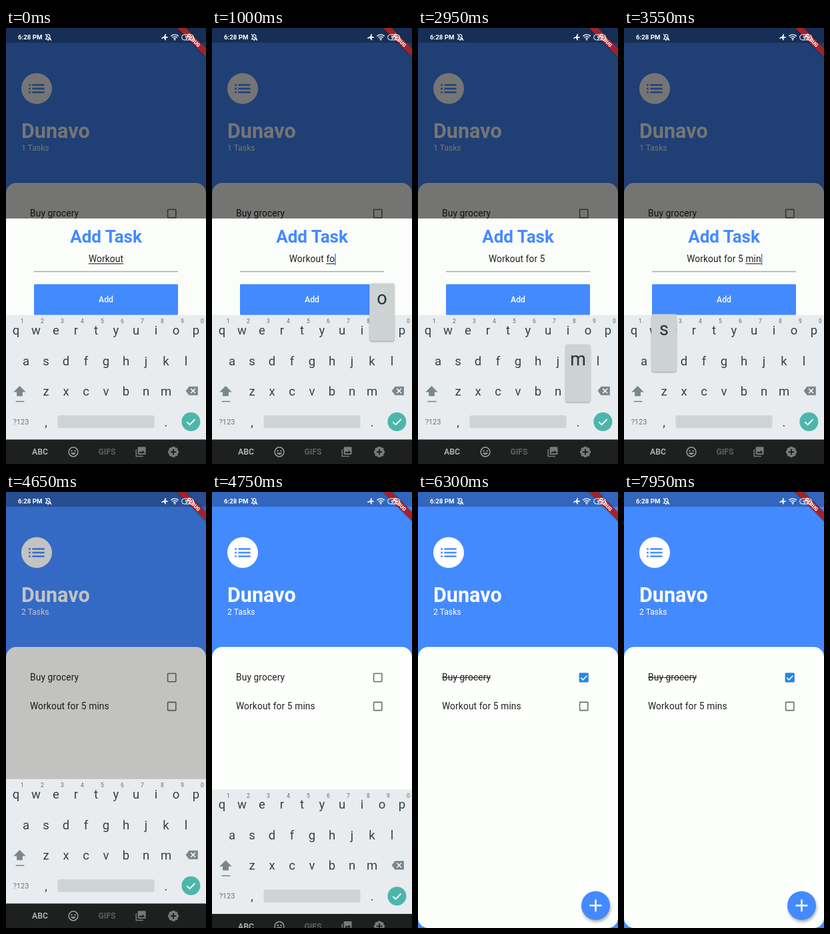
Recreate the animation shown at these times as an HTML page. Size 300x650 px, loop 8000 ms.

```html
<!DOCTYPE html>
<html lang="en">
<head>
<meta charset="utf-8">
<title>To-do list</title>
<style>
  html, body { margin: 0; width: 100%; height: 100%; overflow: hidden; background: #448aff; }
  svg { display: block; width: 100%; height: 100%; }
  text { font-family: Roboto, "Open Sans", sans-serif; white-space: pre; }
  .mid { text-anchor: middle; }
  .task { font-size: 13.75px; letter-spacing: .115px; fill: #212121; }
  .key { font-size: 18.5px; fill: #364147; text-anchor: middle; }
  .hint { font-size: 8.5px; fill: #5f6b70; text-anchor: middle; }
  .mode { font-size: 11px; fill: #68747a; text-anchor: middle; }
  .tab { font-size: 12.2px; font-weight: 700; text-anchor: middle; }
</style>
</head>
<body>
<svg id="stage" viewBox="0 0 300 650" preserveAspectRatio="none"></svg>
<script>
const LOOP = 8000;
const SHEET_OUT = 4550, BOARD_OUT = 4700, TICK = 5700;
const SPACE = '#ced3d5', SPACE_DOWN = '#b3babd';

// What the field holds from each time on
const edits = [
  [-700, 'Workout'], [700, 'Workout '], [850, 'Workout f'], [1000, 'Workout fo'],
  [1150, 'Workout for'], [1400, 'Workout for '], [1950, 'Workout for 5'],
  [2000, 'Workout for 5 '], [3000, 'Workout for 5 m'], [3150, 'Workout for 5 mi'],
  [3350, 'Workout for 5 min'], [3600, 'Workout for 5 mins']
];

// Key, centre x, row centre y, down, up
const presses = [
  ['f', 120, 496, 800, 900], ['o', 255, 450, 950, 1050], ['r', 105, 450, 1100, 1150],
  ['5', 135, 450, 1900, 1980], ['m', 240, 541, 2950, 3050], ['i', 225, 450, 3100, 3200],
  ['n', 210, 541, 3300, 3400], ['s', 60, 496, 3500, 3650]
];
const spaceDowns = [[650, 750], [1350, 1450], [1980, 2080]];
const symbolsOn = 1650, symbolsOff = 2100;

const rect = (x, y, w, h, fill, more = '') =>
  `<rect x="${x}" y="${y}" width="${w}" height="${h}" fill="${fill}" ${more}/>`;
const path = (d, more) => `<path d="${d}" ${more}/>`;
const text = (x, y, s, more = '') =>
  `<text x="${x}" y="${y}" ${more}>${s.replace(/&/g, '&amp;').replace(/</g, '&lt;')}</text>`;
const row = (chars, x, cy) =>
  [...chars].map((c, i) => text(x + 30 * i, cy + 6.5, c, 'class="key"')).join('');
const box = cy => rect(242.6, cy - 6.1, 12.2, 12.2, 'none', 'rx=".6" stroke="#6d6f6d" stroke-width="1.6"');

const statusIcons = `
  ${text(18, 17.4, '6:28 PM', 'font-size="9.7" font-weight="700" fill="#fff"')}
  <g fill="none" stroke="#fff" stroke-width="1.1" stroke-linecap="round">
    ${path('M59.5 16.6h7.6l-1.3-1.8v-2.5a2.5 2.5 0 0 0-5 0v2.5zM62.6 18.3h1.4M63.3 9.6v-.4M59.2 9.3l8.6 9')}
  </g>
  ${path('M233 14.2l4-1.1 1.8-4.2h1.3l-.7 4.2h2.3c1.7 0 1.7 1.7 0 1.7h-2.3l.7 3.4h-1.3l-1.9-3.2-2 .2-.7 1h-.8l.3-1.8z', 'fill="#fff"')}
  <g fill="none" stroke="#fff" stroke-width="1.3">
    ${path('M247.4 12.2a8.2 8.2 0 0 1 11.4 0M249.4 14.3a5.3 5.3 0 0 1 7.4 0M251.4 16.2a2.5 2.5 0 0 1 3.4 0')}
  </g>
  <circle cx="253.1" cy="17.6" r="1" fill="#fff"/>
  ${rect(263.6, 9.9, 18, 8, 'none', 'rx="4" stroke="#fff" stroke-width="1"')}
  ${text(272.6, 16.5, '95', 'class="mid" font-size="7" font-weight="700" fill="#fff"')}`;

const banner = `
  <g transform="translate(300 0) rotate(45)">
    ${rect(-45, 21.4, 90, 9.2, '#000', 'opacity=".5" filter="url(#soft)"')}
    ${rect(-45, 21.4, 90, 9.2, '#a3222a')}
    ${text(0, 28.8, 'DEBUG', 'class="mid" font-size="7.6" font-weight="900" fill="#fff"')}
  </g>`;

const listIcon = [84.9, 90.4, 95.9].map(y =>
  rect(34.2, y - 1.3, 2.6, 2.6, '#448aff') + rect(39.4, y - 1.2, 18.2, 2.4, '#448aff')).join('');

const app = `
  ${rect(0, 0, 300, 650, '#448aff')}
  ${rect(0, 0, 300, 22, '#000', 'opacity=".26"')}
  <circle cx="46" cy="90.3" r="23" fill="#fff"/>
  ${listIcon}
  ${text(23, 164, 'Dunavo', 'font-size="30.55" font-weight="700" fill="#fff"')}
  ${text(23, 183, '', 'id="count" font-size="12.2" fill="#fff"')}
  ${rect(0, 231, 300, 419, '#fdfffc', 'rx="15.3"')}
  ${text(36, 281, 'Buy grocery', 'class="task"')}
  ${rect(36, 276.2, 73, 1, '#212121', 'id="strike"')}
  ${box(276.6)}
  <g id="tick">
    ${rect(241.8, 269.8, 13.8, 13.8, '#1f88ec', 'rx="1"')}
    ${path('M244.2 276.8l3.2 3.2 6.1-6.3', 'id="mark" fill="none" stroke="#fff" stroke-width="1.6" stroke-dasharray="14"')}
  </g>
  <g id="second">${text(36, 324, 'Workout for 5 mins', 'class="task"')}${box(319.5)}</g>
  <circle cx="267.5" cy="619.5" r="21" opacity=".38" filter="url(#blur)"/>
  <circle cx="266.5" cy="616.5" r="21.5" fill="#448aff"/>
  ${path('M257.5 616.5h18M266.5 607.5v18', 'stroke="#fff" stroke-width="2.5"')}`;

const sheet = `
  ${rect(0, 284, 300, 370, '#fbfdfa')}
  ${text(150, 320.3, 'Add Task', 'class="mid" font-size="26" font-weight="700" fill="#448aff"')}
  ${text(150, 349, '', 'id="field" class="task"')}
  ${rect(0, 351, 0, 1, '#212121', 'id="compose"')}
  ${rect(0, 336.5, 1.5, 17, '#4285f4', 'id="caret"')}
  ${rect(42, 362.6, 216, 1, '#858785')}
  ${rect(42, 382, 216, 45.8, '#448aff', 'rx="1.5"')}
  ${text(150, 409, 'Add', 'class="mid" font-size="12.2" font-weight="500" fill="#fff"')}`;

const hints = [...'1234567890'].map((d, i) => text(24.3 + 30 * i, 440.3, d, 'class="hint"')).join('');
const letters = `
  ${row('qwertyuiop', 15, 450)}${hints}${row('asdfghjkl', 30, 496)}${row('zxcvbnm', 60, 541)}
  ${path('M20.5 533.5l-9.2 9.3h4.8v6h8.8v-6h4.8z', 'fill="#7b868b"')}
  ${rect(14.5, 556, 13, 1.5, '#7b868b')}
  ${text(22.5, 591, '?123', 'class="mode"')}
  ${rect(77.5, 577.5, 145, 19, SPACE, 'id="space" rx="3"')}`;
const symbols = `
  ${row('1234567890', 15, 450)}${row('@#$%&-+()', 30, 496)}${row('*"\':;!?', 60, 541)}
  ${text(21, 545, '= \\ <', 'class="mode" style="font-size:10px"')}
  ${text(22.5, 591, 'ABC', 'class="mode"')}
  ${row('_', 90, 587)}${row('/', 210, 587)}
  ${rect(107.5, 577.5, 85, 19, SPACE, 'id="symSpace" rx="3"')}`;

const strip = `
  ${rect(0, 613.5, 300, 40, '#1d201e')}
  ${text(51, 636.3, 'ABC', 'class="tab" fill="#a9aca9"')}
  ${text(151.5, 636.3, 'GIFS', 'class="tab" fill="#5d615e"')}
  <circle cx="101" cy="632" r="6.9" fill="none" stroke="#9a9d9a" stroke-width="1.5"/>
  ${path('M97.2 633.3h7.6a3.9 3.6 0 0 1-7.6 0zM97.4 629.5h2.2v2h-2.2zM102.4 629.5h2.2v2h-2.2z', 'fill="#9a9d9a"')}
  ${path('M195.2 628v10.6h10.8', 'fill="none" stroke="#777b78" stroke-width="1.5"')}
  ${rect(197.6, 624.5, 12, 11.5, '#777b78', 'rx="1.3"')}
  ${path('M199 634l2.4-3.2 1.7 2 2.3-3 3 4.2z', 'fill="#1d201e"')}
  ${rect(244.5, 625.5, 13, 13, '#777b78', 'rx="2.5"')}
  ${rect(244.5, 625.5, 13, 13, '#777b78', 'rx="2.5" transform="rotate(45 251 632)"')}
  ${path('M246.8 632h8.4M251 627.8v8.4', 'stroke="#1d201e" stroke-width="1.9"')}`;

const board = `
  ${rect(0, 428, 300, 190, '#e8ecee')}
  <g id="letters">${letters}</g>
  <g id="symbols">${symbols}</g>
  ${rect(3, 572, 38, 31, '#000', 'id="modeDown" rx="4" opacity=".1"')}
  ${row(',', 60, 587)}${row('.', 240, 587)}
  ${path('M269.6 541l5-6.6h13.2v13.2h-13.2z', 'fill="#7b868b"')}
  ${path('M277.2 537.6l6.8 6.8M284 537.6l-6.8 6.8', 'stroke="#f2f5f5" stroke-width="1.5"')}
  <circle cx="277.4" cy="587" r="14" fill="#4db6ac"/>
  ${path('M271.3 587.3l4.2 4.2 8-8.2', 'fill="none" stroke="#fff" stroke-width="1.8"')}
  ${strip}
  <g id="popup">
    ${rect(-18.5, -67, 37, 84.5, '#000', 'rx="3" opacity=".35" filter="url(#soft)"')}
    ${rect(-18.8, -69.5, 37.6, 86, '#cdd2d3', 'rx="3"')}
    ${text(0, -38, '', 'id="popChar" class="key" style="font-size:27px;fill:#263238"')}
  </g>`;

const stage = document.getElementById('stage');
stage.innerHTML = `
  <defs>
    <filter id="soft" x="-20%" y="-50%" width="140%" height="200%"><feGaussianBlur stdDeviation="1.2"/></filter>
    <filter id="blur" x="-30%" y="-30%" width="160%" height="160%"><feGaussianBlur stdDeviation="2.6"/></filter>
  </defs>
  ${app}
  ${rect(0, 0, 300, 650, '#000', 'id="dim"')}
  <g id="sheet">${sheet}</g>
  ${banner}
  <g id="board">${board}</g>
  ${statusIcons}`;

const ui = {};
stage.querySelectorAll('[id]').forEach(n => ui[n.id] = n);

const clamp = v => Math.max(0, Math.min(1, v));
const smooth = v => v * v * (3 - 2 * v);
const show = (node, on) => node.setAttribute('display', on ? 'inline' : 'none');
const set = (node, attrs) => Object.entries(attrs).forEach(([k, v]) => node.setAttribute(k, v));
const within = (t, a, b) => t >= a && t < b;

function drawField(t) {
  const [since, value] = edits.filter(e => e[0] <= t).pop();
  ui.field.textContent = value;
  const width = ui.field.getComputedTextLength();
  const left = 150 - width / 2;
  ui.field.setAttribute('x', left);

  const word = value.match(/[a-z]+$/i);
  show(ui.compose, word);
  if (word) {
    const len = ui.field.getSubStringLength(word.index, word[0].length);
    set(ui.compose, { x: left + width - len, width: len });
  }
  set(ui.caret, { x: left + width });
  show(ui.caret, (t - since) % 1000 < 500);
}

function drawBoard(t) {
  const p = smooth(clamp((t - BOARD_OUT) / 316));
  show(ui.board, p < 1);
  ui.board.setAttribute('transform', `translate(0 ${222 * p})`);

  const sym = within(t, symbolsOn, symbolsOff);
  show(ui.symbols, sym);
  show(ui.letters, !sym);
  show(ui.modeDown, within(t, 1550, 1700));
  const fill = spaceDowns.some(([a, b]) => within(t, a, b)) ? SPACE_DOWN : SPACE;
  set(ui.space, { fill });
  set(ui.symSpace, { fill });

  const hit = presses.find(k => within(t, k[3], k[4]));
  show(ui.popup, hit);
  if (hit) {
    ui.popChar.textContent = hit[0];
    ui.popup.setAttribute('transform', `translate(${hit[1]} ${hit[2]})`);
  }
}

function draw(t) {
  const out = clamp((t - SHEET_OUT) / 180);
  const added = t >= SHEET_OUT;
  ui.count.textContent = added ? '2 Tasks' : '1 Tasks';
  show(ui.second, added);
  set(ui.dim, { opacity: .54 * (1 - out) });
  show(ui.sheet, out < 1);
  ui.sheet.setAttribute('transform', `translate(0 ${366 * out})`);
  if (out < 1) drawField(t);

  const tick = clamp((t - TICK) / 200);
  show(ui.strike, t >= TICK);
  set(ui.tick, { opacity: clamp(tick * 2) });
  set(ui.mark, { 'stroke-dashoffset': 14 * (1 - clamp(tick * 2 - 1)) });
  drawBoard(t);
}

const start = performance.now();
function frame() {
  draw((performance.now() - start) % LOOP);
  requestAnimationFrame(frame);
}
frame();
</script>
</body>
</html>
```
